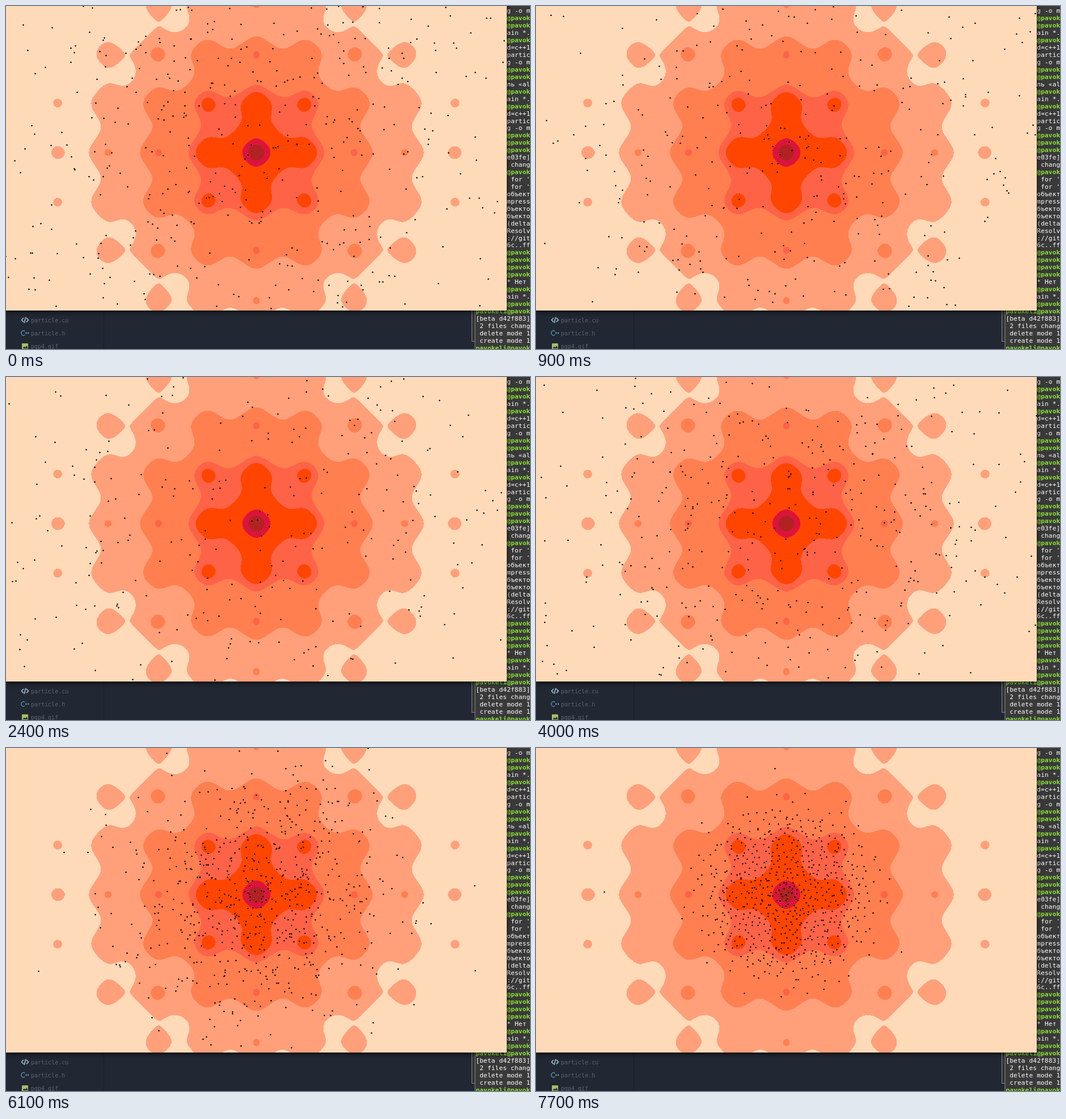
These frames come from a looping animation (924 px wide and 606 px high, 8000 ms). An HTML page with a canvas:

```html
<!DOCTYPE html>
<html lang="en">
<head>
<meta charset="utf-8">
<title>Particle swarm</title>
<style>
html, body { margin: 0; width: 100%; height: 100%; overflow: hidden; background: #212733; }
svg, canvas { position: absolute; left: 0; top: 0; display: block; }
canvas { box-shadow: 0 2px 9px rgba(0, 0, 0, .75); }
text { white-space: pre; }
.term { font: 11.2px "DejaVu Sans Mono", monospace; letter-spacing: .11px; fill: #fff; }
.prompt { font-weight: bold; fill: #8ae234; }
.side { font: 10px "DejaVu Sans Mono", monospace; fill: #5c6773; }
</style>
</head>
<body>
<svg width="924" height="606" viewBox="0 0 924 606">
  <rect width="924" height="606" fill="#212733"/>
  <rect x="172" y="530" width="1" height="76" fill="#191e2a"/>
  <g fill="none" stroke="#9fc3cf" stroke-width="1.6">
    <path d="M31 551l-3.5 3.7 3.5 3.7M36 551l3.5 3.7-3.5 3.7M34.8 549.5l-2.6 10.5"/>
    <path d="M33.4 574.6a4 4 0 1 0 0 6.2M34 577.7h3M35.5 576.2v3M37.6 577.7h3M39.1 576.2v3" stroke="#568ca5" stroke-width="1.4"/>
  </g>
  <rect x="28" y="596" width="11" height="11" rx="1" fill="#a5bf68"/>
  <path d="M29.500 605l2.500-3.500 2 2 2.500-3.500 2 5z" fill="#212733"/>
  <g class="side">
    <text x="44" y="558.500">particle.cu</text>
    <text x="44" y="581.500">particle.h</text>
    <text x="44" y="604.500">pgp4.gif</text>
  </g>
  <rect x="821.500" y="500.500" width="120" height="92" fill="#333" stroke="#8a8a8a"/>
  <rect x="827" y="0" width="97" height="606" fill="#393939"/>
  <rect x="826.500" y="0" width="1" height="606" fill="#8a8a8a"/>
  <g id="term" class="term"></g>
</svg>
<canvas id="view" width="883" height="538"></canvas>
<svg id="cursor" width="924" height="606" viewBox="0 0 924 606">
  <path d="M688.500 341.500v14.500l3.400-3.100 2.500 5.600 2.600-1.200-2.500-5.400h4.500z" fill="#fff" stroke="#111"/>
</svg>
<script>
const W = 883, H = 538, CX = 441, CY = 258.5, UNIT = 88.3, LOOP = 8000, COUNT = 650;
const TAU = Math.PI * 2;
const view = document.getElementById("view").getContext("2d");
const cursor = document.getElementById("cursor");

// "@" marks a shell prompt; the covered left part of each row is omitted
const rows = ["g -o main", "@", "@", "ain *.o", "@", "d=c++11", "particle", "g -o main",
  "@", "@", "ль «all»", "@", "ain *.o", "@", "d=c++11", "particle", "g -o main",
  "@", "@", "@", "e03fe] ", " changed", "@", " for '", " for '", "объектов", "mpressing",
  "бъектов", "бъектов", "(delta ", "Resolving", "://git", "6c..ff", "@", "@", "@", "@",
  "* Нет", "@", "ain *.o", "@"];
const lowRows = ["@", "[beta d42f883]", " 2 files changed", " delete mode 100644", " create mode 100644", "@"];
const user = "pavokeli";

function addRow(text, i, x, prompt) {
  const el = document.createElementNS("http://www.w3.org/2000/svg", "text");
  el.setAttribute("x", x);
  el.setAttribute("y", 12.4 + 12.94 * i);
  if (text === "@") el.setAttribute("class", "prompt");
  el.textContent = text === "@" ? prompt : text;
  document.getElementById("term").append(el);
}
rows.forEach((s, i) => addRow(s, i, 883.3, "@" + user));
lowRows.forEach((s, i) => addRow(s, i + rows.length, 828.4, user + "@" + user));

// Ackley function, shaded by level
function ackley(x, y) {
  return 20 - 20 * Math.exp(-.2 * Math.sqrt((x * x + y * y) / 2))
    + Math.E - Math.exp((Math.cos(TAU * x) + Math.cos(TAU * y)) / 2);
}
const levels = [1, 2, 4, 5, 7, 9, Infinity];
const colors = [0xb22222, 0xdc143c, 0xff4500, 0xff6347, 0xff7f50, 0xffa07a, 0xffdab9];

function makeField() {
  const img = view.createImageData(W, H);
  for (let y = 0, p = 0; y < H; y++) {
    for (let x = 0; x < W; x++, p += 4) {
      const f = ackley((x - CX) / UNIT, (y - CY) / UNIT);
      const c = colors[levels.findIndex(l => f < l)];
      img.data.set([c >> 16, c >> 8 & 255, c & 255, 255], p);
    }
  }
  return img;
}
const field = makeField();

let seed = 4217;
function rand() {
  seed = seed + 0x6d2b79f5 | 0;
  let v = Math.imul(seed ^ seed >>> 15, 1 | seed);
  v = v + Math.imul(v ^ v >>> 7, 61 | v) ^ v;
  return ((v ^ v >>> 14) >>> 0) / 4294967296;
}
const gauss = () => Math.sqrt(-2 * Math.log(1 - rand())) * Math.cos(TAU * rand());

// Each particle settles on a jittered sunflower lattice; a few stay far out
const strays = [[-20, -226], [-326, -5], [199, 102], [104, -165]];
const swarm = Array.from({ length: COUNT }, (_, i) => {
  const u = (i + .5) / COUNT, r = 150 * u ** .58 + 40 * u ** 12, a = i * 2.39996;
  const jitter = 2 + 12 * u ** 4;
  const home = strays[COUNT - 1 - i] ||
    [r * Math.cos(a) + gauss() * jitter * .6, r * Math.sin(a) + gauss() * jitter * .6];
  return { home, from: [gauss(), gauss()], to: [gauss(), gauss()], rate: .06 + .3 * rand() };
});

const lateSteps = [4000, 4400, 4800, 5200, 5600, 6100, 6500, 6900, 7300, 7700];

function stepAt(t) {
  if (t < 4000) return Math.min(24, Math.floor(t / 100));
  return 24 + lateSteps.filter(s => s <= t).length;
}

function spreadAt(step) {
  if (step <= 24) return 255 + 100 * Math.min(1, step / 17);
  return 250 * (1 - (lateSteps[step - 25] - 4000) / 3800) ** 1.3;
}

function draw(step) {
  const spread = spreadAt(step);
  view.putImageData(field, 0, 0);
  view.fillStyle = "#000";
  for (const { home, from, to, rate } of swarm) {
    const c = Math.cos(rate * step), s = Math.sin(rate * step);
    const x = Math.round(CX + home[0] + (from[0] * c + to[0] * s) * spread * 1.05);
    const y = Math.round(CY + home[1] + (from[1] * c + to[1] * s) * spread);
    view.fillRect(x - 1, y, 3, 1);
    view.fillRect(x, y - 1, 1, 3);
  }
  cursor.style.display = step >= 16 && step <= 18 ? "block" : "none";
}

const start = performance.now();
let shown = -1;
function frame() {
  const step = stepAt((performance.now() - start) % LOOP);
  if (step !== shown) draw(shown = step);
  requestAnimationFrame(frame);
}
frame();
</script>
</body>
</html>
```
